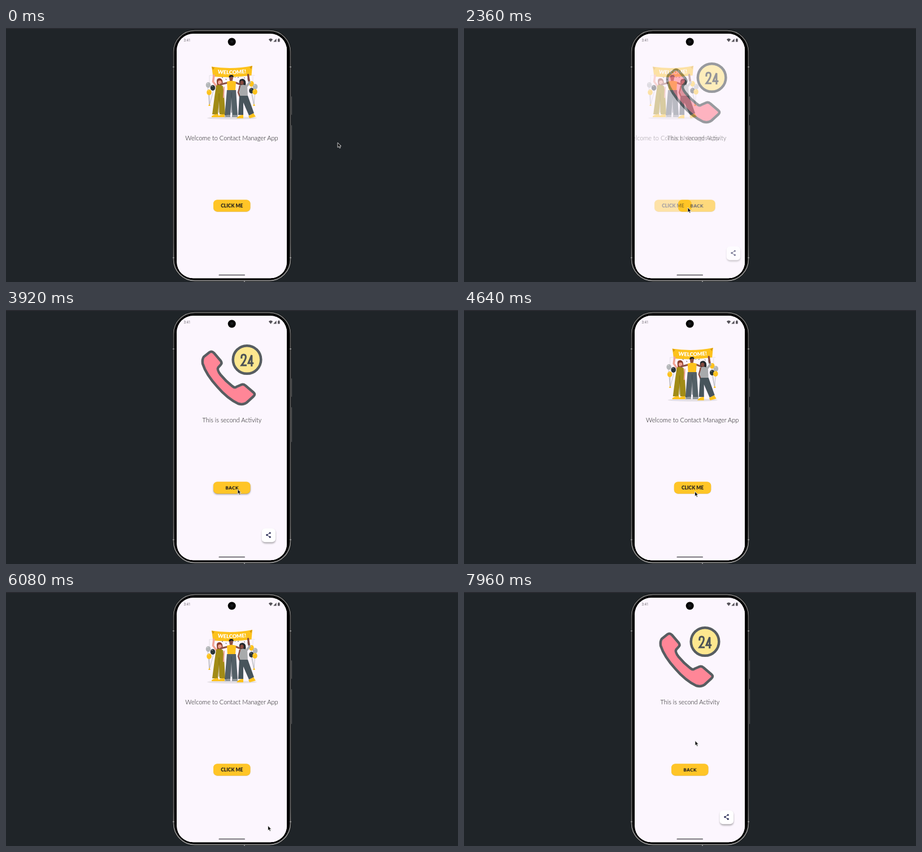
An HTML page that plays this animation: 800 by 450 pixels, repeating every 8 s.

```html
<!DOCTYPE html>
<html lang="en">
<head>
<meta charset="utf-8">
<title>Contact Manager App</title>
<style>
  html, body { margin: 0; width: 100%; height: 100%; overflow: hidden; background: #1f2428; }
  svg { display: block; width: 100vw; height: 100vh; }
  text { font-family: Lato, sans-serif; text-anchor: middle; }
  .line { fill: none; stroke-linecap: round; stroke-linejoin: round; }
  .title { font-size: 11px; font-weight: 300; fill: #111; }
  .label { font-weight: 900; fill: #29251d; }
  .wide { font-family: "DejaVu Sans", sans-serif; font-weight: 700; }
  .banner { font-size: 9.4px; font-weight: 900; fill: #fff; }
  .clock { font-family: Roboto, sans-serif; font-size: 6.3px; fill: #77737a; }
  .yellow { fill: #fdc21c; }
  .slate { fill: #536067; }
  .dark { fill: #2b3538; }
  .silver { fill: #b4b7b9; }
</style>
</head>
<body>
<svg viewBox="0 0 800 450">
  <defs>
    <clipPath id="screen"><rect x="302.3" y="10.3" width="194.7" height="433" rx="29"/></clipPath>
    <linearGradient id="metal" x2="0" y2="1">
      <stop offset="0" stop-color="#777"/><stop offset=".1" stop-color="#5c5c5c"/>
      <stop offset=".85" stop-color="#666"/><stop offset="1" stop-color="#999"/>
    </linearGradient>
    <filter id="soft" x="-30%" y="-60%" width="160%" height="220%"><feGaussianBlur stdDeviation="1.7"/></filter>
    <path id="bannerLine" d="M366 79.5Q400 84.5 434 78.5"/>
    <path id="arrow" d="M0 0V8.600L2 6.900 3.400 9.900 5 9.200 3.600 6.200H6.200Z"/>
  </defs>

  <rect width="800" height="450" fill="#1f2428"/>
  <rect width="800" height="1.3" fill="#2d2d34"/>

  <!-- phone body -->
  <g fill="#777">
    <rect x="503.500" y="121" width="2.300" height="33" rx="1"/>
    <rect x="503.500" y="172" width="2.300" height="62" rx="1"/>
  </g>
  <rect x="295" y="3" width="210" height="446" rx="39" fill="#0b0b0b"/>
  <rect x="296.600" y="4.600" width="206.800" height="443" rx="37.500" fill="#000" stroke="url(#metal)" stroke-width="1.900"/>
  <path d="M295 69h3M502 69h3M295 407h3M502 407h3M422 447v3" stroke="#999" stroke-width="1.6"/>

  <g clip-path="url(#screen)">
    <rect x="300" y="8" width="200" height="438" fill="#fcf6fe"/>
    <g id="pages">
      <g id="welcome">
        <rect x="200" y="0" width="400" height="450" fill="#fcf6fe"/>
        <ellipse cx="400" cy="159.5" rx="44" ry="2.5" fill="#e3dfe5"/>
        <path class="line" d="M360 137V84H440M366 86V70M437 86V112" stroke="#dfdbe1" stroke-width=".8"/>
        <g class="line" stroke="#9aa0a3" stroke-width=".6">
          <path d="M357 104L360 137 367 111M360 118V137M434 103L439 137 441 108M434 115L439 137"/>
        </g>
        <g id="balloons"></g>
        <path class="yellow" d="M358 138l2-4 2 4zM437 138l2-4 2 4z"/>

        <path class="yellow" d="M364 68.5Q400 74 436 67L434.5 84Q400 89 366.5 86Z"/>
        <path d="M364 68.5l5 2-3 4zM436 67l-5 2 3 4z" fill="#d99a0c"/>
        <text class="banner"><textPath href="#bannerLine" startOffset="50%">WELCOME!</textPath></text>
        <path d="M382 87l2 1M389 90l1 2M410 88l2-1M415 91l-1 2M405 87l1 1M421 88l2 1" stroke="#555" stroke-width="1"/>

        <!-- woman on the left -->
        <path class="line" d="M373 104L366.5 95 368 84" stroke="#f1a496" stroke-width="3.6"/>
        <path d="M373 96Q372 88 379 89Q385 91 383 101L374 104Z" fill="#8f402b"/>
        <circle cx="378.5" cy="96.5" r="3.4" fill="#efa08e"/>
        <path d="M372 102Q377 99 384 103L386 117 388 153H378L377 128 375 153H365L369 122Z" fill="#a18b16"/>
        <path d="M377 116V150" stroke="#7e6b0c" stroke-width=".8"/>
        <path d="M386 105L385 123" class="line" stroke="#efa08e" stroke-width="2"/>
        <path class="yellow" d="M364 156Q371 151 376 153V158H364ZM374 157Q381 152 387 153V158H374Z"/>

        <!-- man in the middle -->
        <path class="line" d="M392 97L380 100M407 97L417 101" stroke="#8d5145" stroke-width="3.2"/>
        <path d="M396 90h5v6h-5z" fill="#8d5145"/>
        <ellipse cx="398.5" cy="89" rx="3.3" ry="4" fill="#8d5145"/>
        <path d="M394.5 88Q394 83 399 83Q403.5 83 402.5 88L400 86Z" fill="#1c2022"/>
        <path class="yellow" d="M391 95Q399 92 407 95L406 111H392Z"/>
        <path class="slate" d="M391 110H407L410 155H400.5L399 122 397 155H387Z"/>
        <path d="M399 114V150" stroke="#3d484e" stroke-width=".9"/>
        <path d="M387 158Q388 153 397 154V158ZM400 154H410V158H400Z" fill="#90969a"/>

        <!-- woman on the right -->
        <path class="line" d="M425 104L431 97 429 90" stroke="#a8aaac" stroke-width="4"/>
        <path class="line" d="M430 93L428.5 83" stroke="#86493e" stroke-width="3.4"/>
        <path d="M413 97Q412 90 419 90Q426 91 424 103L416 103Z" fill="#24282b"/>
        <ellipse cx="417.5" cy="97" rx="3.1" ry="3.7" fill="#86493e"/>
        <path d="M412 103Q420 98 427 103L428 121H413Z" fill="#a8aaac"/>
        <path d="M414 103L411 114 414 122" class="line" stroke="#86493e" stroke-width="2.3"/>
        <path d="M413 120H428L439 151 430 155 420 132 420 154H411Z" fill="#47545b"/>
        <path class="yellow" d="M408 160Q413 153 420 154V160H408ZM429 156L438 151 442 157 431 160Z"/>

        <text class="title" x="399.5" y="199.2">Welcome to Contact Manager App</text>
        <g class="button"></g>
        <text class="label" x="399.8" y="317.7" font-size="8.5">CLICK ME</text>
      </g>

      <g id="second">
        <rect x="200" y="0" width="400" height="450" fill="#fcf6fe"/>
        <g class="line" stroke="#575d61" stroke-width="4.5">
          <path fill="#ff8697" d="M350 83L360 75Q364 72 368 76L380 90Q383 94 380 97L375.500 102Q373 106 380 115Q389 126 400 134.500Q405 139 408 136L415 133Q420 130 424 134L438 146Q442 149.500 438 153L426 164Q420 168.500 411 166Q392 157 374 136Q354 114 348 95Q347 87 350 83Z"/>
          <circle cx="426.500" cy="88" r="24.800" fill="#fde78f"/>
        </g>
        <path d="M416.800 86V83.500Q416.800 79 420.600 79Q424.400 79 424.400 83.500Q424.400 88 417 98H426M434.800 100V80L429 94.300H438.300" fill="none" stroke="#4c5256" stroke-width="3.100"/>
        <text class="title" x="399.800" y="199.200">This is second Activity</text>
        <g class="button"></g>
        <text class="label wide" x="399.900" y="317.500" font-size="7.700">BACK</text>
        <rect x="453" y="389" width="24" height="24.500" rx="6" opacity=".32" filter="url(#soft)"/>
        <rect x="452.500" y="387" width="24.500" height="24.300" rx="6" fill="#fff"/>
        <path d="M467 395L461.800 398.600 467 402.200" class="line" stroke="#252752" stroke-width="1"/>
        <g fill="#252752"><circle cx="461.800" cy="398.600" r="1.600"/><circle cx="467.200" cy="395" r="1.600"/><circle cx="467.200" cy="402.200" r="1.600"/></g>
      </g>
    </g>

    <!-- system bars -->
    <text class="clock" x="320.500" y="24">3:41</text>
    <g fill="#56535a">
      <path d="M464.800 20.200Q468.500 17 472.200 20.200L468.500 24.800Z"/>
      <path d="M473.200 24.500L478.600 18.800V24.500Z"/>
      <path d="M481 19.500h1v-1h1.700v1h1v5h-3.700z"/>
    </g>
    <rect x="376.500" y="436.800" width="46.500" height="1.800" rx=".9" fill="#66636a"/>
  </g>
  <circle cx="399.700" cy="24.500" r="7" fill="#050505"/>
  <circle cx="399.700" cy="24" r="2.600" fill="#17191d"/>

  <use id="cursor" href="#arrow" fill="#111" stroke="#f4f4f4" stroke-width=".8" stroke-linejoin="round"/>
</svg>
<script>
const LOOP = 8000, STEP = 40, SLIDE = 450, SHIFT = 42;
const $ = id => document.getElementById(id);

// Each slide starts at a time and brings in one page.
const slides = [[-1000, 'welcome'], [2260, 'second'], [4480, 'welcome'], [6400, 'second']];
const presses = [[1960, 2300], [3860, 4480], [6320, 6440]];
const path = [
  [0, 587, 203], [40, 587, 203], [420, 480, 268], [800, 396, 318], [3440, 396, 318],
  [3600, 402, 334], [3840, 410, 317.5], [4360, 410, 317.5], [4560, 408.5, 321.5],
  [5240, 408.5, 321.5], [5880, 465, 404], [6080, 463.5, 414], [6120, 463.5, 414],
  [6320, 405, 318], [6880, 405, 318], [7320, 465, 408], [7680, 465, 395], [7960, 409, 263.5]
];

$('balloons').innerHTML = [
  [358, 101, 'silver'], [366, 106, 'dark'], [359.5, 114, 'yellow'],
  [434.5, 99, 'yellow'], [441, 104, 'silver'], [434.5, 111, 'dark'], [440.5, 113, 'yellow']
].map(([x, y, tone]) => `<ellipse class="${tone}" cx="${x}" cy="${y}" rx="4.3" ry="5"/>
  <path d="M${x - 2} ${y - 2}q1-2 2-1" fill="none" stroke="#fff" stroke-width=".8" opacity=".7"/>`).join('');

for (const button of document.querySelectorAll('.button')) {
  button.innerHTML = `<rect class="lift" x="367" y="306" width="65.5" height="21" rx="7" opacity="0" filter="url(#soft)"/>
    <rect x="367" y="304.7" width="65.7" height="21.2" rx="7" opacity=".18"/>
    <rect x="367" y="304.2" width="65.5" height="21.2" rx="7" fill="#ffc527"/>`;
}
const lifts = document.querySelectorAll('.lift');

const clamp = v => Math.min(1, Math.max(0, v));
const smooth = u => u * u * (3 - 2 * u);
const cubic = (a, b, c, d, s) => {
  const r = 1 - s;
  return a * r * r * r + 3 * b * s * r * r + 3 * c * s * s * r + d * s * s * s;
};

// Fast start, very slow settle: two joined Bezier segments.
function settle(u) {
  const [xs, ys] = u < 1 / 6
    ? [[0, .05, .1333, 1 / 6], [0, 0, .06, .4]]
    : [[1 / 6, .2083, .25, 1], [.4, .82, 1, 1]];
  let low = 0, high = 1;
  for (let i = 0; i < 20; i++) {
    const mid = (low + high) / 2;
    if (cubic(...xs, mid) < u) low = mid; else high = mid;
  }
  return cubic(...ys, low);
}

function cursorAt(t) {
  const next = path.findIndex(point => point[0] > t);
  if (next < 0) return path[path.length - 1].slice(1);
  const [t0, x0, y0] = path[next - 1], [t1, x1, y1] = path[next];
  const u = smooth((t - t0) / (t1 - t0));
  return [x0 + (x1 - x0) * u, y0 + (y1 - y0) * u];
}

function draw(t) {
  const [start, name] = slides.filter(slide => slide[0] <= t).pop();
  const age = t - start, p = settle(clamp(age / SLIDE));
  const enter = $(name), leave = $(name === 'second' ? 'welcome' : 'second');
  if ($('pages').lastElementChild !== enter) $('pages').append(enter);
  enter.setAttribute('transform', `translate(${SHIFT * (1 - p)})`);
  enter.setAttribute('opacity', clamp((age - 50) / 83));
  enter.setAttribute('visibility', 'visible');
  leave.setAttribute('transform', `translate(${-SHIFT * p})`);
  leave.setAttribute('opacity', 1);
  leave.setAttribute('visibility', age < SLIDE ? 'visible' : 'hidden');

  const lift = Math.max(...presses.map(([a, b]) => Math.min(clamp((t - a) / 60), clamp((b - t) / 60))));
  lifts.forEach(shadow => shadow.setAttribute('opacity', .3 * lift));
  $('cursor').setAttribute('transform', `translate(${cursorAt(t)})`);
}

const begin = performance.now();
function tick() {
  const t = (performance.now() - begin) % LOOP;
  draw(Math.floor(t / STEP) * STEP);
  requestAnimationFrame(tick);
}
tick();
</script>
</body>
</html>
```
